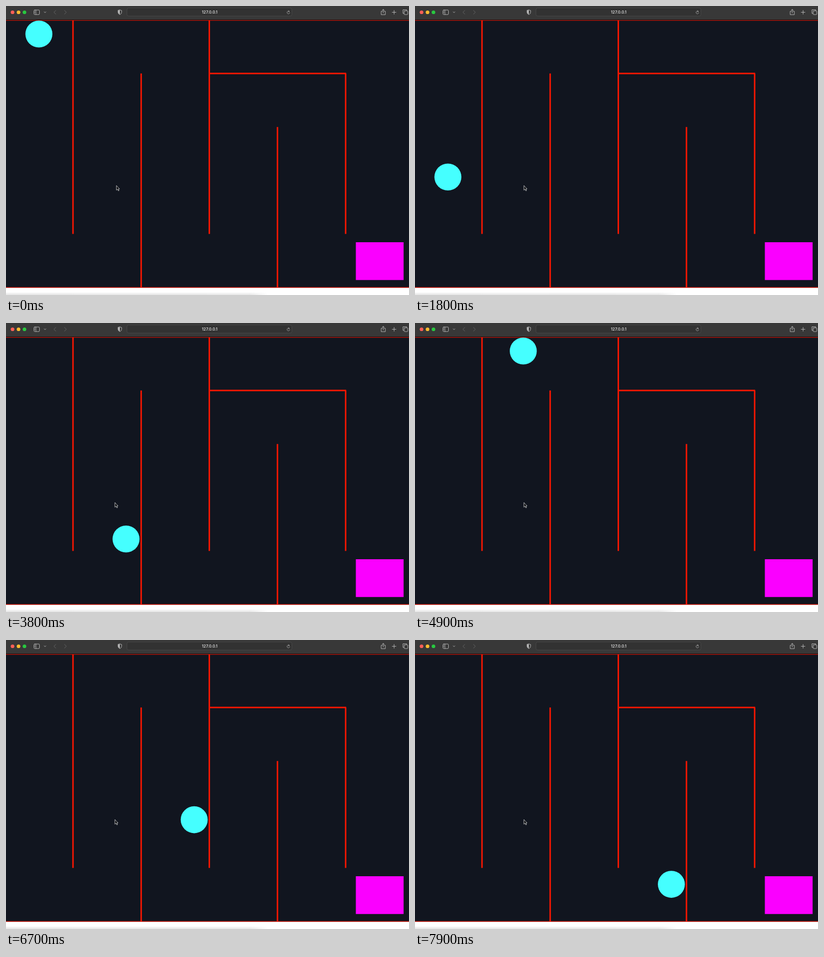
An HTML page that plays this animation: 800x575 px, repeating every 8 s.

```html
<!DOCTYPE html>
<html lang="en">
<head>
<meta charset="utf-8">
<title>Maze</title>
<style>
html, body { margin: 0; width: 100%; height: 100%; overflow: hidden; background: #fff; }
svg { display: block; }
text { font: 500 8px Inter, "Liberation Sans", sans-serif; }
</style>
</head>
<body>
<svg width="800" height="575" viewBox="0 0 800 575">
  <defs>
    <linearGradient id="shade" x2="0" y2="1">
      <stop stop-color="#fff"/><stop offset="1" stop-color="#e4e4e4"/>
    </linearGradient>
    <linearGradient id="fade">
      <stop offset=".93" stop-color="#fff" stop-opacity="0"/><stop offset="1" stop-color="#fff"/>
    </linearGradient>
  </defs>

  <!-- page -->
  <rect y="28" width="800" height="532" fill="#11151f"/>
  <rect y="569" width="520" height="6" fill="url(#shade)"/>
  <rect y="569" width="520" height="6" fill="url(#fade)"/>
  <path d="M0 28.5H800M0 560H800" stroke="#c8160a" stroke-width="1.4"/>
  <path id="maze" stroke="#f91601" stroke-width="2.9"/>
  <rect x="694.5" y="470" width="94.8" height="75.2" fill="#fa00ff"/>
  <circle id="ball" r="26.8" fill="#45ffff"/>

  <!-- browser bar -->
  <rect width="800" height="28" fill="#101010"/>
  <rect width="800" height="27" fill="#383838"/>
  <circle cx="13" cy="12.5" r="3.6" fill="#fe5f57"/>
  <circle cx="24.9" cy="12.5" r="3.6" fill="#febc2e"/>
  <circle cx="36.7" cy="12.5" r="3.6" fill="#28c840"/>
  <rect x="240" y="4" width="327.5" height="16" rx="3.5" fill="#323232" stroke="#4c4c4c" stroke-width=".8"/>
  <text x="404.3" y="15.3" fill="#eee" text-anchor="middle">127.0.0.1</text>
  <g fill="none" stroke="#b5b5b5" stroke-width="1" stroke-linecap="round" stroke-linejoin="round">
    <rect x="55.5" y="8" width="11" height="9" rx="1.6"/>
    <path d="M59.5 8V17M57 10.3H58M57 12.2H58M57 14H58" stroke-width=".8"/>
    <path d="M75.8 11.6L77.5 13.3L79.2 11.6"/>
    <path d="M99 8.8L95 12.5L99 16.2M116 8.8L120 12.5L116 16.2" stroke="#646464"/>
    <path d="M226 7.8L229.6 9V12.5Q229.4 15.4 226 17.2Q222.6 15.4 222.4 12.5V9Z"/>
    <path d="M226 8V17Q222.6 15.4 222.4 12.5V9Z" fill="#b5b5b5" stroke="none"/>
    <path d="M562.6 11.1A2.7 2.7 0 1 0 563.3 13.4M560.6 8.8L562.6 10.8L560.4 12" stroke-width=".8"/>
    <path d="M747 10.5H744.8V17.3H753V10.5H750.8M748.9 14V6.8M746.8 8.8L748.9 6.7L751 8.8M766.6 12.5H774.2M770.4 8.7V16.3"/>
    <path d="M790 14.7H788V7.5H795.5V9.5"/>
    <rect x="790.3" y="9.7" width="7.4" height="7.4" rx="1.2"/>
  </g>

  <path id="cursor" d="M0 0V9.2L2.2 7.3L3.8 10.6L5.2 10L3.7 6.8H6.2Z" fill="#08090c" stroke="#e8e8e8" stroke-width=".8"/>
</svg>
<script>
const [maze, ball, cursor] = ["maze", "ball", "cursor"].map(id => document.getElementById(id));
const LOOP = 8000, FRAME = 100, TICK = 10;
const TOP = 28.5, FLOOR = 560, CELL_W = 135.3, CELL_H = 106.4, REACH = 30;
const START = { x: 65.3, y: 55.8 }, LOWEST = 532.6;

const column = n => 133 + CELL_W * (n - 1);
const row = n => TOP - 0.6 + CELL_H * n;

// upright walls, one per column edge
const walls = [[0, 4], [1, 5], [0, 4], [2, 5], [1, 4]].map(([from, to], i) => ({
  x: column(i + 1),
  top: from ? row(from) : TOP,
  bottom: to < 5 ? row(to) : FLOOR
}));
maze.setAttribute("d", walls.map(w => `M${w.x} ${w.top}V${w.bottom}`).join("") +
  `M${column(3)} ${row(1)}H${column(5) + 1}`);

// steering: from this time on, velocity in px per second
const moves = [
  { t: 0, vx: 0, vy: 158 },
  { t: 2470, vx: 180, vy: 158 },
  { t: 3100, vx: 108, vy: -147 },
  { t: 3800, vx: -48, vy: -380 },
  { t: 4500, vx: 0, vy: -380 },
  { t: 4830, vx: 146, vy: 0 },
  { t: 5430, vx: 146, vy: 254 },
  { t: 6300, vx: 0, vy: 202 },
  { t: 6700, vx: 0, vy: 253 },
  { t: 7230, vx: 205, vy: 253 },
  { t: 7600, vx: 205, vy: -155 }
];

// drifts freely, and stops at walls, ceiling and floor
function ballAt(time) {
  let { x, y } = START;
  for (let t = 0; t < time; t += TICK) {
    const { vx, vy } = moves.findLast(m => m.t <= t);
    x += vx * TICK / 1000;
    y = Math.min(LOWEST, Math.max(START.y, y + vy * TICK / 1000));
    const hit = walls.find(w => Math.abs(x - w.x) < REACH && y > w.top && y < w.bottom);
    if (hit && (hit.x - x) * vx > 0) x = hit.x - Math.sign(vx) * REACH;
  }
  return { x, y };
}

function draw() {
  const t = Math.floor(performance.now() % LOOP / FRAME) * FRAME;
  const { x, y } = ballAt(t);
  ball.setAttribute("cx", x);
  ball.setAttribute("cy", y);
  cursor.setAttribute("transform", `translate(${t < FRAME ? 219.2 : 216.2} 357.2)`);
  requestAnimationFrame(draw);
}
draw();
</script>
</body>
</html>
```
